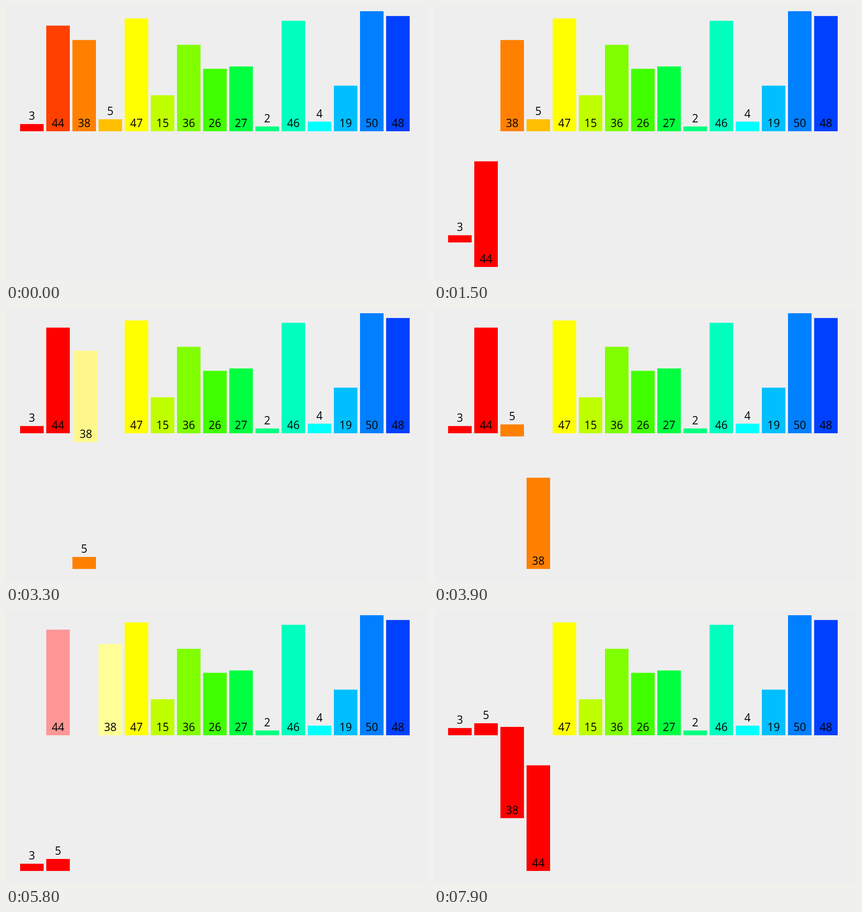
An HTML page with a canvas that plays this animation: 807 by 525 pixels, repeating every 8000 ms.

```html
<!DOCTYPE html>
<html lang="en">
<head>
<meta charset="utf-8">
<title>Merge sort</title>
<style>
  html, body { margin: 0; width: 100%; height: 100%; overflow: hidden; background: #eee; }
  canvas { display: block; }
</style>
</head>
<body>
<canvas id="stage" width="807" height="525"></canvas>
<script>
const ctx = document.getElementById('stage').getContext('2d');

const LOOP = 8000, TICK = 100, MOVE = 250;
const LEFT = 27, PITCH = 50, WIDTH = 45, BASE = 240, DROP = 260, UNIT = 4.6;
const VALUES = [3, 44, 38, 5, 47, 15, 36, 26, 27, 2, 46, 4, 19, 50, 48];
const RED = [255, 0, 0], ORANGE = [255, 128, 0];

// Rainbow in 15 degree steps that skips pure green.
function rainbow(i) {
  const hue = 15 * (i + (i > 7));
  return [0, 240, 120].map(shift => {
    const distance = Math.abs(((hue + shift + 180) % 360) - 180);
    return Math.round(255 * Math.min(1, Math.max(0, 2 - distance / 60)));
  });
}

const mix = (a, b, p) => a + (b - a) * p;
const ease = p => p < 0.5 ? 4 * p ** 3 : 1 - 4 * (1 - p) ** 3;

function paint(bar, color, p) {
  bar.color = bar.color.map((c, i) => mix(c, color[i], p));
}

// Actions: each returns a function that applies itself to the bars by a share p.
const light = i => (bars, p) =>
  paint(bars[i], bars[i].color.map(c => Math.min(255, c + 150)), p);

const drop = (i, slot, color) => (bars, p) => {
  const bar = bars[i];
  bar.slot = mix(bar.slot, slot, p);
  bar.y = mix(bar.y, DROP, p);
  paint(bar, color, p);
};

const lift = i => (bars, p) => {
  bars[i].y = mix(bars[i].y, 0, p);
};

// Start time in ms, then the actions that run together.
const STEPS = [
  [70, light(0), light(1)],
  [510, drop(0, 0, RED)],
  [960, drop(1, 1, RED)],
  [1411, lift(0)],
  [1865, lift(1)],

  [2330, light(2), light(3)],
  [2775, drop(3, 2, ORANGE)],
  [3237, drop(2, 3, ORANGE)],
  [3695, lift(3)],
  [4145, lift(2)],

  [4617, light(0), light(3)],
  [5060, drop(0, 0, RED), light(1)],
  [5515, drop(3, 1, RED), light(2)],
  [5985, drop(2, 2, RED)],
  [6422, drop(1, 3, RED)],
  [6885, lift(0)],
  [7335, lift(3)],
  [7785, lift(2)]
];

function barsAt(time) {
  const bars = VALUES.map((value, i) => ({ value, slot: i, y: 0, color: rainbow(i) }));
  for (const [start, ...actions] of STEPS) {
    if (time <= start) break;
    const p = ease(Math.min(1, (time - start) / MOVE));
    actions.forEach(act => act(bars, p));
  }
  return bars;
}

function drawBar({ value, slot, y, color }) {
  const x = LEFT + slot * PITCH, bottom = BASE + y, height = value * UNIT;
  ctx.fillStyle = `rgb(${color.map(Math.round).join()})`;
  ctx.fillRect(x, bottom - height, WIDTH, height);
  ctx.fillStyle = '#000';
  ctx.fillText(value, x + WIDTH / 2, (value < 10 ? bottom - height : bottom) - 8);
}

function frame(now) {
  const time = Math.floor((now % LOOP) / TICK) * TICK;
  ctx.fillStyle = '#eee';
  ctx.fillRect(0, 0, 807, 525);
  ctx.font = '21px "Open Sans", "Noto Sans", sans-serif';
  ctx.textAlign = 'center';
  barsAt(time).forEach(drawBar);
}

const origin = performance.now();
function tick() {
  frame(performance.now() - origin);
  requestAnimationFrame(tick);
}
tick();
</script>
</body>
</html>
```
